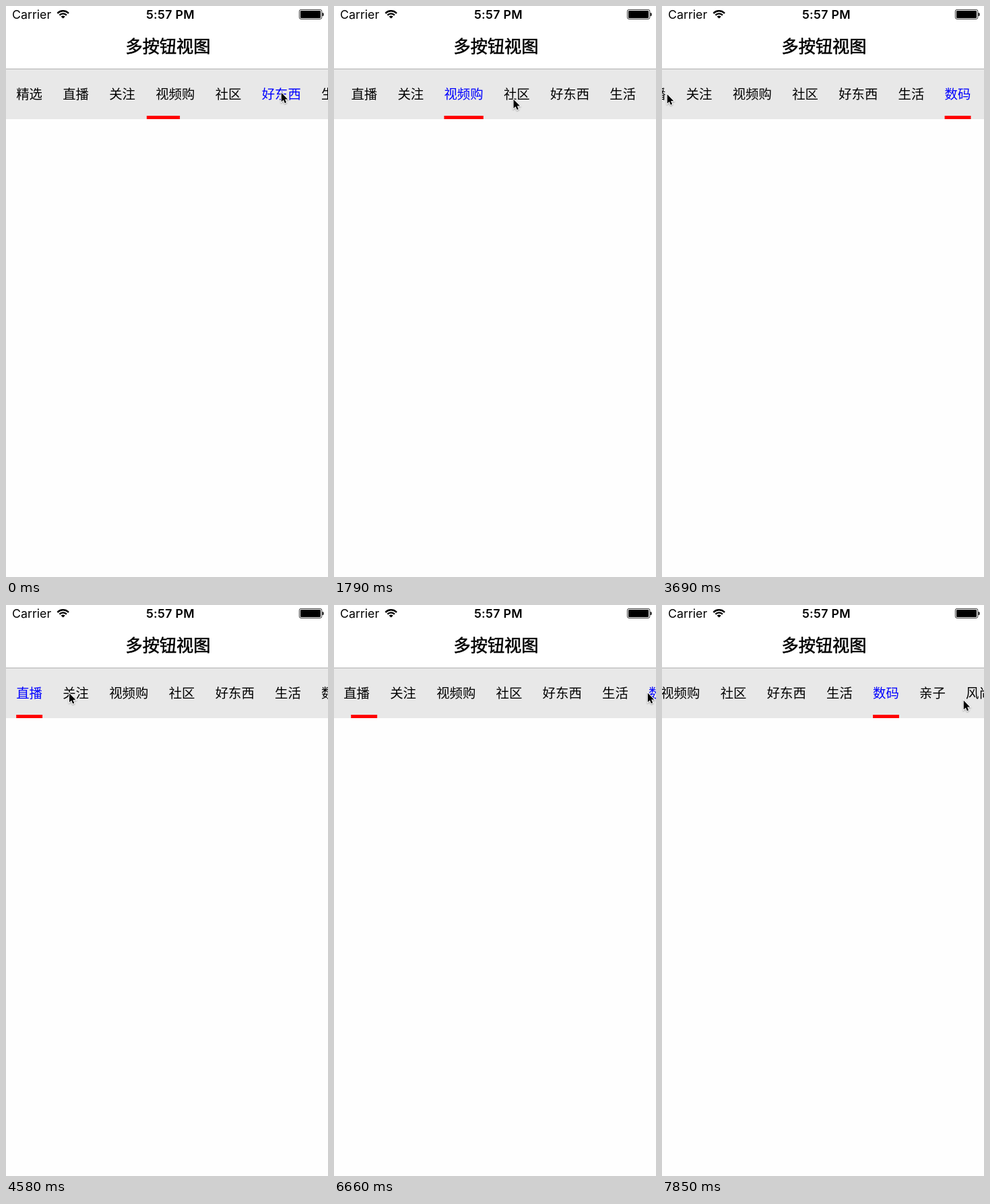
Write an HTML page with a canvas that moves like this. It is 478 px wide and 848 px high and loops after 8000 ms.

```html
<!DOCTYPE html>
<html lang="zh-CN">
<head>
<meta charset="utf-8">
<title>多按钮视图</title>
<style>
  html, body { margin: 0; width: 100%; height: 100%; overflow: hidden; background: #fefefe; }
  canvas { display: block; width: 478px; height: 848px; }
</style>
</head>
<body>
<canvas id="stage" width="478" height="848"></canvas>
<script>
const ctx = document.getElementById('stage').getContext('2d');
const LOOP = 8000, STEP = 147.4, LAST = 53;
const CJK = '"Noto Sans CJK SC", "Noto Sans CJK", sans-serif';
const LATIN = 'Inter, Roboto, sans-serif';

// Tab positions inside the scrolling bar
let left = 15.2;
const tabs = '精选 直播 关注 视频购 社区 好东西 生活 数码 亲子 风尚'.split(' ').map(label => {
  const tab = { label, x: left, w: label.length * 19.45 };
  left += tab.w + 30.1;
  return tab;
});

const ANIM = 2;
const taps = [
  { at: -1.04, tab: 5 },
  { at: 6.97, tab: 3 },
  { at: 15.71, tab: 7 },
  { at: 27.8, tab: 1 },
  { at: 44.8, tab: 7 }
];

const move = (start, end, ...to) => ({ start, end, to });

const marker = {
  from: [tabs[0].x, tabs[0].w],
  moves: taps.map(({ at, tab }) => move(at, at + ANIM, tabs[tab].x, tabs[tab].w))
};

const scrolling = {
  from: [0],
  moves: [
    move(10, 14, 117.5),
    move(27.8, 29.8, 69),
    move(44.8, 46.8, 111.8),
    move(48, 52, 224)
  ]
};

const pointer = {
  from: [408, 128],
  moves: [
    move(1, 6, 255, 132),
    move(6, 8, 334, 140.5),
    move(10, 13, 243, 137),
    move(13, 16, 439, 129.5),
    move(18, 24, 7, 130.5),
    move(29, 36, 465, 130),
    move(45, 48, 462, 135),
    move(48, 50, 390, 140),
    move(50, 53, 447, 141)
  ]
};

const mix = (a, b, p) => a + (b - a) * p;
const ease = p => (1 - Math.cos(Math.PI * Math.min(1, Math.max(0, p)))) / 2;

// Applies every eased move in turn to the starting values.
const glide = ({ from, moves }, t) => moves.reduce((pos, { start, end, to }) => {
  const p = ease((t - start) / (end - start));
  return pos.map((v, i) => mix(v, to[i], p));
}, from);

function box(color, x, y, w, h) {
  ctx.fillStyle = color;
  ctx.fillRect(x, y, w, h);
}

function text(str, x, y, font, color = '#000', spacing = 0) {
  ctx.font = font;
  ctx.letterSpacing = spacing + 'px';
  ctx.fillStyle = color;
  ctx.fillText(str, x, y);
}

function wifi(x, y) {
  const from = -Math.PI / 2 - 0.82, to = -Math.PI / 2 + 0.82;
  ctx.strokeStyle = ctx.fillStyle = '#000';
  ctx.lineWidth = 2.4;
  for (const r of [11.4, 7.2]) {
    ctx.beginPath();
    ctx.arc(x, y, r, from, to);
    ctx.stroke();
  }
  ctx.beginPath();
  ctx.moveTo(x, y);
  ctx.arc(x, y, 4.2, from, to);
  ctx.fill();
}

function battery() {
  ctx.strokeStyle = ctx.fillStyle = '#000';
  ctx.lineWidth = 0.8;
  ctx.beginPath();
  ctx.roundRect(435.4, 5.4, 33.4, 14, 2.5);
  ctx.stroke();
  ctx.beginPath();
  ctx.roundRect(437, 7, 30, 11, 1);
  ctx.roundRect(469.6, 10, 1.9, 5, [0, 1.5, 1.5, 0]);
  ctx.fill();
}

function header() {
  box('#fff', 0, 0, 478, 93);
  text('Carrier', 9, 19, '400 17.8px ' + LATIN);
  wifi(84.7, 18.6);
  ctx.textAlign = 'center';
  text('5:57 PM', 244, 19, '600 17.8px ' + LATIN, '#000', 0.3);
  text('多按钮视图', 240.5, 69.4, '400 25.2px ' + CJK);
  // Thin outline gives the title its medium weight
  ctx.strokeStyle = '#000';
  ctx.lineWidth = 0.6;
  ctx.strokeText('多按钮视图', 240.5, 69.4);
  ctx.textAlign = 'left';
  battery();
  box('#b0b0b0', 0, 93, 478, 1);
}

function tabBar(t) {
  const active = tabs[taps.findLast(tap => tap.at <= t).tab];
  const [scroll] = glide(scrolling, t);
  const [x, w] = glide(marker, t);

  box('#e8e8e8', 0, 94, 478, 74);
  for (const tab of tabs)
    text(tab.label, tab.x - scroll, 137.7, '400 19.4px ' + CJK, tab === active ? '#00f' : '#000');
  box('#f00', x - scroll, 163, w, 5);
}

function arrow(x, y) {
  ctx.save();
  ctx.translate(x + 0.8, y + 0.8);
  ctx.beginPath();
  for (const [px, py] of [[0, 0], [0, 13.4], [3.1, 10.6], [5.1, 15.4], [7.3, 14.5], [5.3, 9.8], [9.4, 9.6]])
    ctx.lineTo(px, py);
  ctx.closePath();
  ctx.shadowColor = 'rgba(0,0,0,.35)';
  ctx.shadowBlur = 2;
  ctx.shadowOffsetY = 1;
  ctx.strokeStyle = '#fff';
  ctx.lineWidth = 2;
  ctx.stroke();
  ctx.shadowColor = 'transparent';
  ctx.fillStyle = '#000';
  ctx.fill();
  ctx.restore();
}

function frame() {
  const t = Math.min(LAST, Math.floor((performance.now() % LOOP) / STEP));
  box('#fefefe', 0, 0, 478, 848);
  header();
  tabBar(t);
  arrow(...glide(pointer, t));
  requestAnimationFrame(frame);
}
frame();
</script>
</body>
</html>
```
